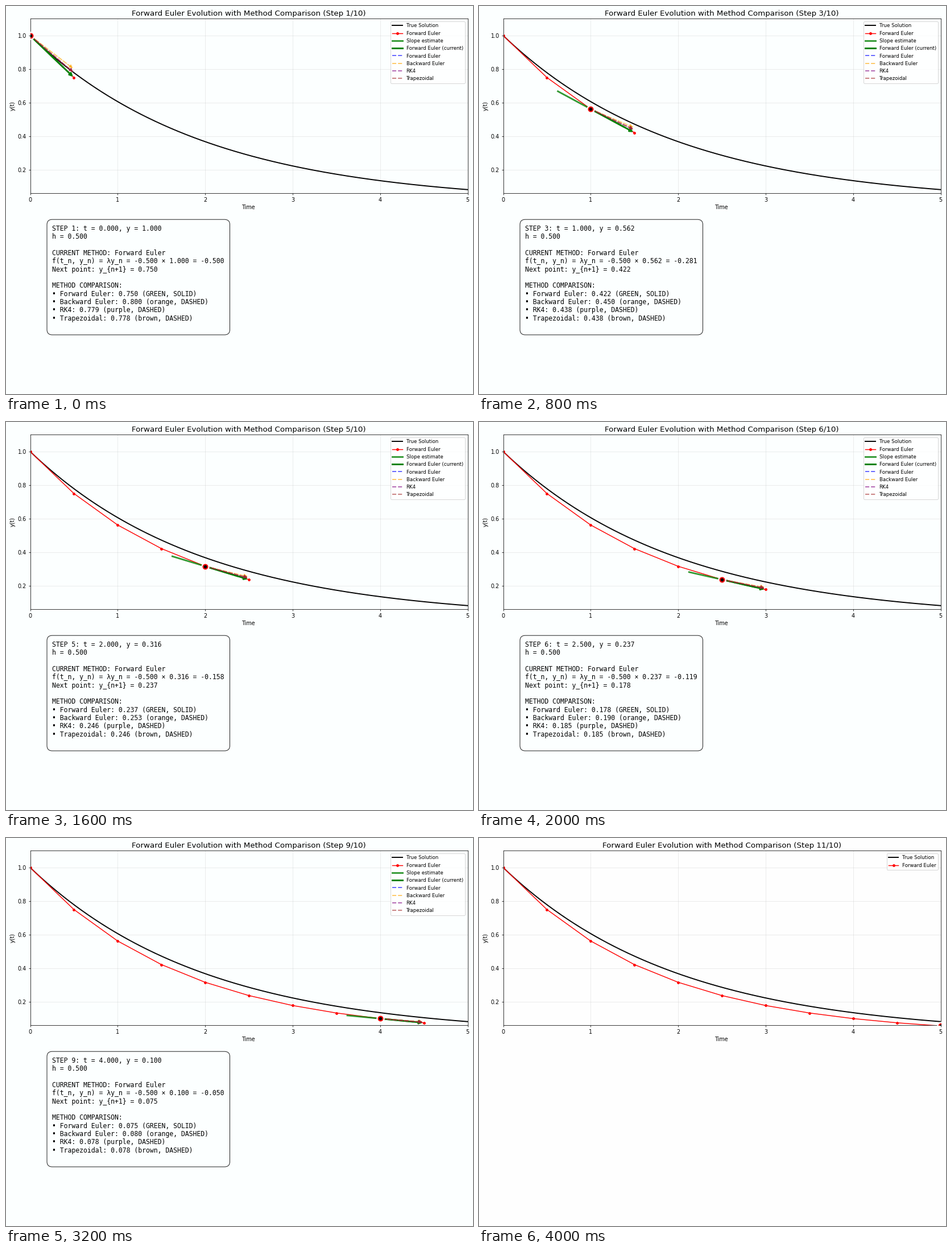
A matplotlib script that plays this animation: 821 px wide and 682 px high, repeating every 4400 ms.

```python
import numpy as np
import matplotlib.pyplot as plt
from matplotlib.animation import FuncAnimation
from matplotlib.lines import Line2D
from matplotlib.patches import FancyBboxPatch

W, H, DPI = 821, 682, 69
LAM, STEP, N_STEPS, T_END = -0.5, 0.5, 10, 5.0
TINT, PLAIN = "#fcffff", "#fefefe"
LEFT, RIGHT, TOP, BOTTOM = 42.5, 811.5, 22.5, 328.8

plt.rcParams["font.family"] = "DejaVu Sans"

z = LAM * STEP
# name: (growth factor per step, color)
METHODS = {
    "Forward Euler": (1 + z, "blue"),
    "Backward Euler": (1 / (1 - z), "orange"),
    "RK4": (1 + z + z**2 / 2 + z**3 / 6 + z**4 / 24, "purple"),
    "Trapezoidal": ((1 + z / 2) / (1 - z / 2), "brown"),
}
CURRENT = "Forward Euler"

steps = np.arange(N_STEPS + 1)
t_euler = steps * STEP
y_euler = METHODS[CURRENT][0] ** steps
t_true = np.linspace(0, T_END, 400)
y_true = np.exp(LAM * t_true)

# A hair above the whole number guards against truncation to one pixel less.
fig = plt.figure(figsize=((W + 0.01) / DPI, (H + 0.01) / DPI), dpi=DPI)
ax = fig.add_axes([LEFT / W, 1 - BOTTOM / H, (RIGHT - LEFT) / W, (BOTTOM - TOP) / H])

# Panel with pixel coordinates, y downwards
panel = fig.add_axes([0, 0, 1, 1], zorder=-1)
panel.set(xlim=(0, W), ylim=(H, 0))
panel.axis("off")
box = panel.add_patch(FancyBboxPatch(
    (72, 375.2), 321.5, 202.8, boxstyle="round,pad=0,rounding_size=9.2",
    facecolor="none", edgecolor="black", linewidth=1, alpha=0.9))
info = [panel.text(81, 394.8 + 14.36 * row, "", fontsize=12,
                   family="DejaVu Sans Mono", va="baseline")
        for row in range(12)]


def info_lines(i):
    t, y = t_euler[i], y_euler[i]
    lines = [
        f"STEP {i + 1}: t = {t:.3f}, y = {y:.3f}",
        f"h = {STEP:.3f}",
        "",
        f"CURRENT METHOD: {CURRENT}",
        f"f(t_n, y_n) = λy_n = {LAM:.3f} × {y:.3f} = {LAM * y:.3f}",
        f"Next point: y_{{n+1}} = {y_euler[i + 1]:.3f}",
        "",
        "METHOD COMPARISON:",
    ]
    for name, (growth, color) in METHODS.items():
        style = "GREEN, SOLID" if name == CURRENT else f"{color}, DASHED"
        lines.append(f"• {name}: {growth * y:.3f} ({style})")
    return lines


def draw_arrow(start, end, **style):
    ax.annotate("", xy=end, xytext=start,
                arrowprops=dict(arrowstyle="-|>", mutation_scale=12, **style))


def draw_step(i):
    """Slope line and one arrow per method; returns extra legend handles."""
    t, y = t_euler[i], y_euler[i]
    reach = 0.75 * STEP * np.array([-1, 1])
    slope, = ax.plot(t + reach, y + LAM * y * reach, color="green", lw=3,
                     alpha=0.8, label="Slope estimate")
    handles = [slope, Line2D([], [], color="green", lw=3,
                             label=f"{CURRENT} (current)")]
    for name, (growth, color) in METHODS.items():
        dashed = dict(color=color, lw=2, ls="--", alpha=0.6)
        style = dict(color="green", lw=3) if name == CURRENT else dashed
        draw_arrow((t, y), (t + STEP, growth * y), **style)
        handles.append(Line2D([], [], label=name, **dashed))
    return handles


def update(i):
    last = i == N_STEPS
    background = PLAIN if last else TINT
    fig.set_facecolor(background)
    ax.clear()
    ax.set_facecolor(background)
    ax.set(xlim=(0, T_END), ylim=(0.75 * y_true[-1], 1.1),
           xlabel="Time", ylabel="y(t)")
    ax.set_title(f"Forward Euler Evolution with Method Comparison "
                 f"(Step {i + 1}/{N_STEPS})", fontsize=14)
    ax.grid(True, alpha=0.3)

    handles = ax.plot(t_true, y_true, color="black", lw=2, label="True Solution")
    handles += ax.plot(t_euler[:i + 2], y_euler[:i + 2], "o-", color="red",
                       lw=1.5, ms=4, label=CURRENT)
    if not last:
        handles += draw_step(i)

    # Current point: halo, ring and core
    for size, color in ((15, background), (10.4, "red"), (6, "black")):
        ax.plot(t_euler[i], y_euler[i], "o", color=color, ms=size, mew=0, zorder=10)

    ax.legend(handles=handles, loc="upper right", fontsize=9)

    box.set_visible(not last)
    for text, line in zip(info, [""] * len(info) if last else info_lines(i)):
        text.set_text(line)
    return []


anim = FuncAnimation(fig, update, frames=N_STEPS + 1, init_func=lambda: update(0),
                     interval=400, repeat=True, repeat_delay=0)
plt.show()
```
